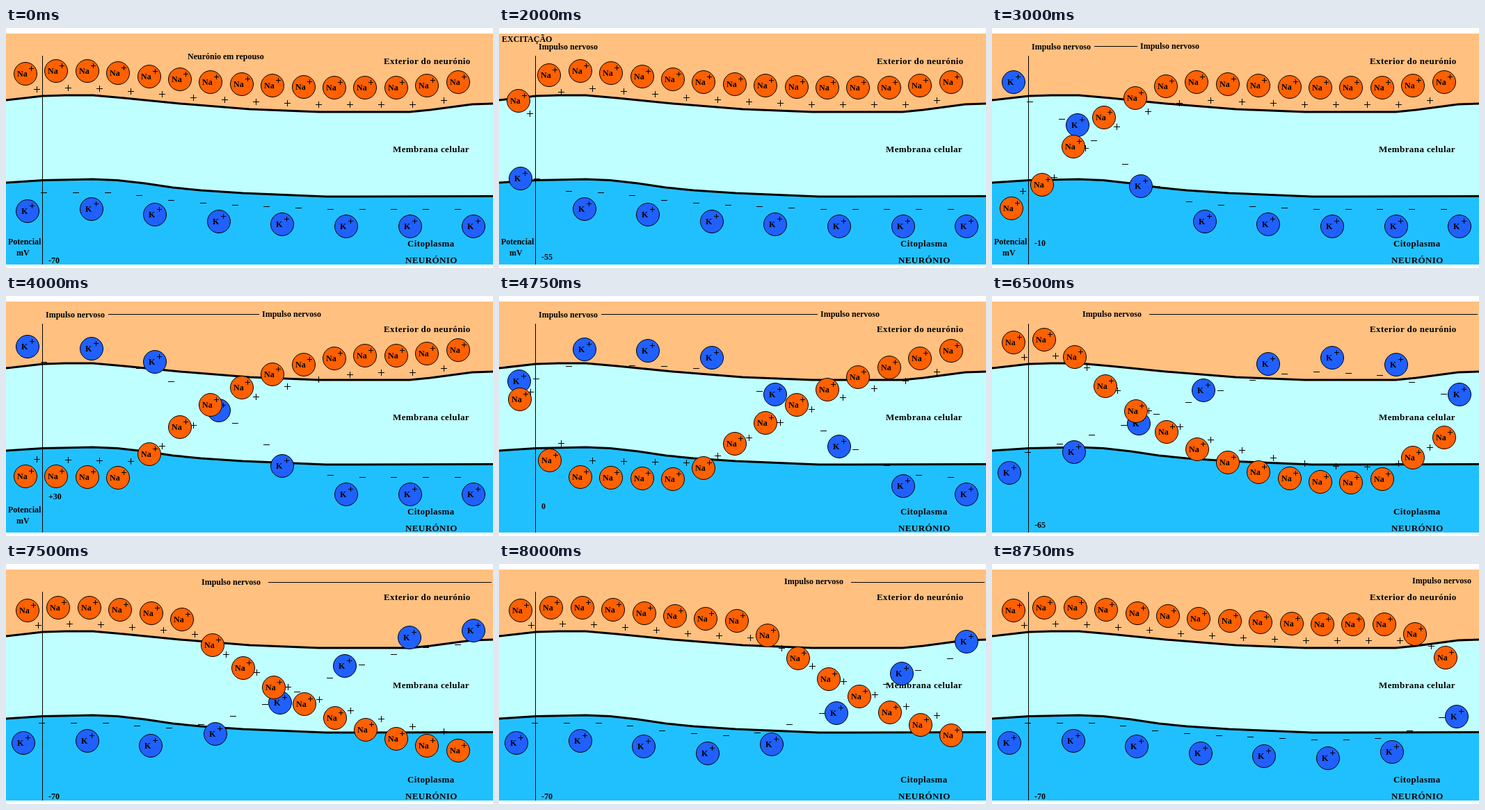
Recreate the animation shown at these times as an HTML page. Size 700 by 346 pixels, loop 9000 ms.

```html
<!DOCTYPE html>
<html lang="pt">
<head>
<meta charset="utf-8">
<title>Impulso nervoso</title>
<style>
html, body { margin: 0; width: 100%; height: 100%; overflow: hidden; background: #fff; }
svg { display: block; width: 700px; height: 346px; }
text { font: bold 12px "Liberation Serif", "Times New Roman", serif; white-space: pre; }
.big { font-size: 13px; letter-spacing: .4px; }
.membrane { fill: none; stroke: #000; stroke-width: 3; stroke-linejoin: round; }
.thin { fill: none; stroke: #000; shape-rendering: crispEdges; }
circle { stroke: #000; }
</style>
</head>
<body>
<svg viewBox="0 0 700 346">
  <rect y="8" width="700" height="333" fill="#ffc080"/>
  <path id="cell" fill="#c0ffff"/>
  <path id="cytoplasm" fill="#20c0ff"/>
  <path id="outer" class="membrane"/>
  <path id="inner" class="membrane"/>
  <path class="thin" d="M52.5 40V341"/>
  <text class="big" x="543" y="52">Exterior do neurónio</text>
  <text class="big" x="556" y="179">Membrana celular</text>
  <text class="big" x="577" y="315">Citoplasma</text>
  <text class="big" x="574" y="339">NEURÓNIO</text>
  <text id="rest" x="261" y="45">Neurónio em repouso</text>
  <text id="excite" x="4" y="20">EXCITAÇÃO</text>
  <g id="unit"><text x="3" y="312">Potencial</text><text x="15" y="328">mV</text></g>
  <text id="volts" x="61"></text>
  <text id="tail">Impulso nervoso</text>
  <text id="head" y="30">Impulso nervoso</text>
  <path id="link" class="thin"/>
  <g id="ions"></g>
</svg>
<script>
const $ = id => document.getElementById(id);
const LOOP = 9000, REST = 2000, STEP = 250;

const clamp = v => Math.min(1, Math.max(0, v));
const mix = (a, b, f) => a + (b - a) * f;
const square = u => u * u;
const smooth = u => u * u * (3 - 2 * u);

// Linear interpolation over keys [position, ...values]
function at(keys, pos) {
  let n = 1;
  while (n < keys.length - 1 && keys[n][0] < pos) n++;
  const a = keys[n - 1], b = keys[n];
  const f = clamp((pos - a[0]) / (b[0] - a[0]));
  return a.slice(1).map((v, j) => mix(v, b[j + 1], f));
}

// Membrane edges
const outer = [[0, 104], [53, 98], [85, 97], [125, 97], [170, 101], [250, 109], [350, 117],
  [450, 121], [580, 121], [610, 118], [670, 110], [700, 109]];
const inner = [[0, 223], [53, 219.5], [125, 218], [160, 219.5], [200, 224], [240, 230],
  [280, 234], [340, 238], [460, 243], [700, 242.5]];
$("outer").setAttribute("d", "M" + outer.join(" "));
$("inner").setAttribute("d", "M" + inner.join(" "));
$("cell").setAttribute("d", `M${outer.join(" ")}V341H0Z`);
$("cytoplasm").setAttribute("d", `M${inner.join(" ")}V341H0Z`);

// Progress at x of a wave that starts at its front and is complete behind its end
const progress = (x, front, end) => clamp((front - x) / Math.max(1, front - end));

// Each wave carries its ions across the membrane and later back again
const sodiumWave = {
  cross: (x, k) => square(progress(x, 100 + 53 * k, -60 + 25 * k + .5 * k * k)),
  back: (x, k) => square(progress(x, 54 * k - 484, .24 * Math.max(0, k - 9) ** 2.7))
};
const potassiumWave = {
  cross: (x, k) => smooth(progress(x, 118 + 47 * k, -150 + 38 * k)),
  back: (x, k) => smooth(progress(x, 47.5 * k - 388, -180 + 2.2 * Math.max(0, k - 9) ** 2))
};

const line = d => `<path class="thin" d="${d}"/>`;
const cross = (x, y, r) => line(`M${x - r} ${y + .5}h${2 * r + 1}M${x + .5} ${y - r}v${2 * r + 1}`);
const ball = (color, name, textX, signX) =>
  `<circle r="16.5" fill="${color}"/><text x="${textX}" y="4">${name}</text>` + cross(signX, -8, 3);

// gap: distance from the edge at rest; far: height on the other side;
// drift: how far the particle returns from its first place; lag: x behind which it follows the wave
const kinds = [
  { markup: line("M-4 .5h9"), wave: potassiumWave, count: 14, first: 54, pitch: 45.75,
    edge: inner, gap: 18, far: x => 93 + .035 * x, drift: [-3, -8], lag: 0 },
  { markup: cross(0, 0, 4), wave: sodiumWave, count: 14, first: 44, pitch: 45,
    edge: outer, gap: -11, far: x => 234 + .022 * x, drift: [2, 0], lag: 22 },
  { markup: ball("#2060ff", "K", -9, 6), wave: potassiumWave, count: 8, first: 31, pitch: 91.6,
    edge: inner, gap: 43, far: x => 72 + .035 * x, drift: [-6, -6], lag: 0 },
  { markup: ball("#ff6000", "Na", -12, 8), wave: sodiumWave, count: 15, first: 28, pitch: 44.4,
    edge: outer, gap: -35, far: x => 259 + .02 * x, drift: [3, 1], lag: 0 }
];

const ions = kinds.flatMap(kind => Array.from({ length: kind.count }, (_, i) => {
  const el = document.createElementNS("http://www.w3.org/2000/svg", "g");
  el.innerHTML = kind.markup;
  $("ions").append(el);
  return { el, kind, x: kind.first + kind.pitch * i };
}));

function place({ kind, x }, step) {
  const { wave, edge, gap, far, drift, lag } = kind;
  const out = step < 0 ? 0 : wave.cross(x - lag, step);
  const back = step < 0 ? 0 : wave.back(x - lag, step);
  const home = at(edge, x)[0] + gap + drift[1] * back;
  return [x + drift[0] * back, mix(home, far(x), out * (1 - back))].map(Math.round);
}

// Millivolts and the baseline of their label
const voltKeys = [[-1, -70, 339], [0, -55, 334], [8, 30, 293], [14, -30, 321], [18, -65, 334], [19, -70, 339]];
// Places of the two labels of the impulse
const headKeys = [[0, 57], [8, 368], [14, 555], [16, 612]];
const tailKeys = [[14, 57, 31], [18, 130, 30], [22, 281, 30], [27, 604, 28]];

const show = (id, on) => $(id).style.display = on ? "" : "none";

function draw(step) {
  for (const ion of ions) ion.el.setAttribute("transform", `translate(${place(ion, step)})`);
  show("rest", step < 0);
  show("excite", step >= 0 && step < 4);
  show("unit", step < 9);

  const [mv, voltY] = at(voltKeys, step);
  const volts = Math.round(mv / 5) * 5;
  $("volts").textContent = volts > 0 ? "+" + volts : volts;
  $("volts").setAttribute("y", Math.round(voltY));

  const head = Math.round(at(headKeys, step)[0]);
  const [tail, tailY] = at(tailKeys, step).map(Math.round);
  const headOn = step >= 3 && step <= 16, tailOn = step >= 0;
  $("head").setAttribute("x", head);
  $("tail").setAttribute("x", tail);
  $("tail").setAttribute("y", tailY);
  show("head", headOn);
  show("tail", tailOn);
  const start = tail + (step > 14 ? 96 : 90);
  const end = headOn ? head - 4 : 698;
  show("link", step >= 3 && end > start);
  $("link").setAttribute("d", `M${start} 26.5H${end}`);
}

const begin = performance.now();
let shown;
function tick() {
  const t = (performance.now() - begin) % LOOP;
  const step = t < REST ? -1 : Math.floor((t - REST) / STEP);
  if (step !== shown) draw(shown = step);
  requestAnimationFrame(tick);
}
tick();
</script>
</body>
</html>
```
